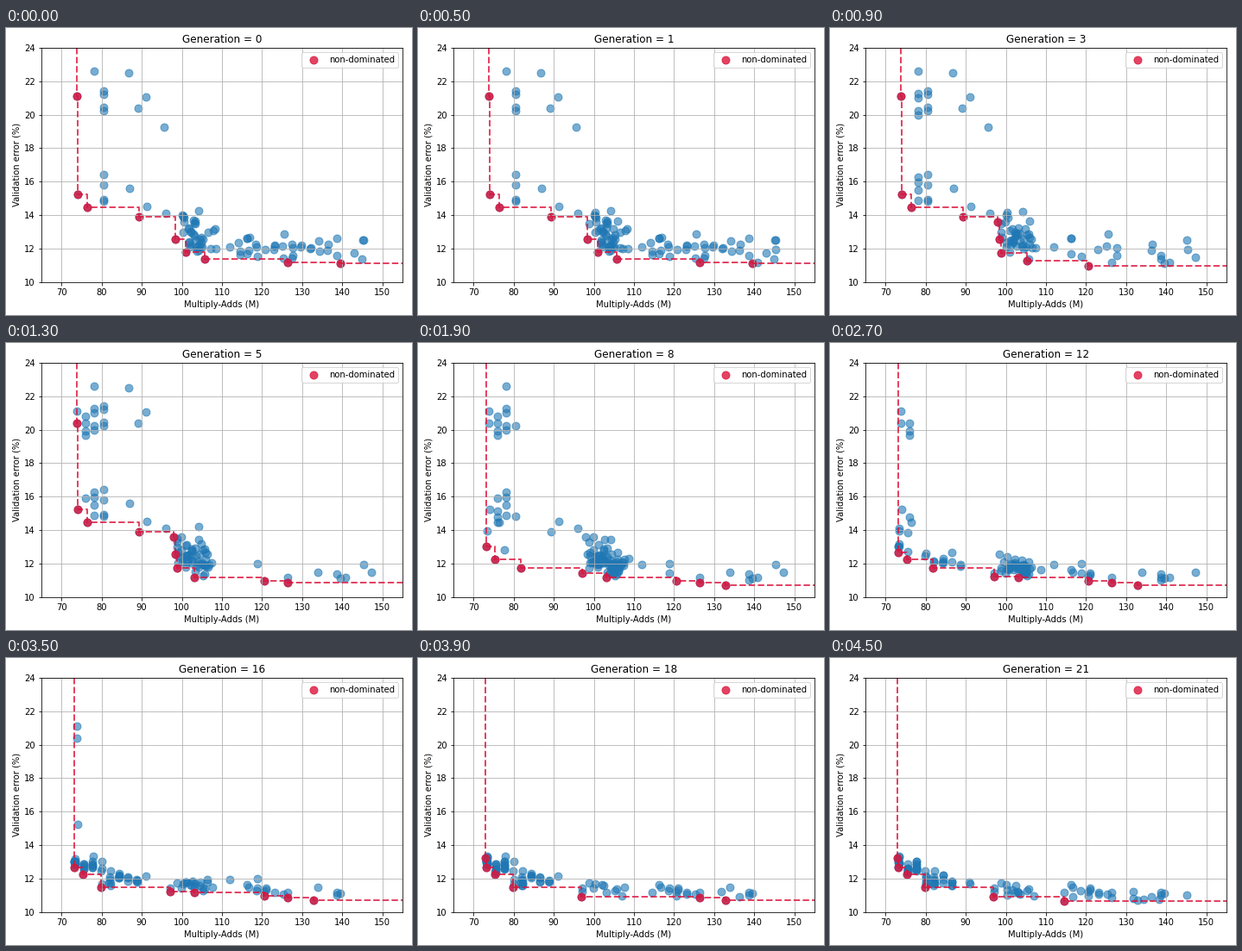
These frames come from a looping animation (470x333 px, 5 s). A matplotlib script:

```python
import matplotlib.pyplot as plt
import numpy as np
from matplotlib.animation import FuncAnimation

WIDTH, HEIGHT, DPI = 470, 333, 72
TICK_MS, LOOP_MS = 100, 5000
GENERATIONS = 22
COLUMN_STEP = 2.2  # designs cluster at regular multiply-add counts

# Designs that shape the front, by the generation that finds them.
LEADERS = {
    0: [(73.9, 21.1), (74.1, 15.25), (76.5, 14.45), (89.3, 13.9),
        (98.4, 12.55), (101, 11.77), (105.7, 11.37), (126.4, 11.2),
        (139.4, 11.12)],
    2: [(98, 13.6), (98.8, 11.75), (105.3, 11.3), (120.5, 10.97)],
    4: [(103.2, 11.2)],
    5: [(73.85, 20.4), (126.3, 10.87)],
    6: [(132.8, 10.7)],
    7: [(81.9, 11.75)],
    8: [(73.2, 13.05), (75.3, 12.25), (97.1, 11.45)],
    10: [(73.2, 12.65), (97.1, 11.25)],
    14: [(79.9, 11.5)],
    18: [(73, 13.25), (96.9, 10.9)],
    19: [(114.5, 10.65)],
}
OUTLIERS = [(78.1, 22.6), (86.8, 22.5), (91, 21.05), (89.1, 20.4),
            (95.6, 19.25), (87, 15.6), (91.3, 14.5), (95.9, 14.1)]

rng = np.random.default_rng(11)


def smoothstep(t):
    t = np.clip(t, 0, 1)
    return t * t * (3 - 2 * t)


def leaders_at(generation):
    return np.array([point for born, points in LEADERS.items()
                     if born <= generation for point in points])


def pareto_front(points):
    front, best = [], np.inf
    for x, y in sorted(map(tuple, points)):
        if y < best:
            front.append((x, y))
            best = y
    return np.array(front)


def depth(points, front):
    """How far each point lies behind the front; 4 M count as 1 %."""
    gaps = (points[:, None] - front[None]) / (4, 1)
    return gaps.min(axis=2).max(axis=1)


def tolerance(generation):
    return 0.8 + 4.8 / (1 + np.exp((generation - 7.3) / 1.5))


def offspring(generation):
    """Designs scattered above the front: cheap columns, knee and tail."""
    front = pareto_front(leaders_at(generation))
    cheap = 0.62 * smoothstep((generation - 6) / 7)
    tail = 0.15 + 0.3 * np.exp(-generation)
    spread = 0.35 + 0.8 * np.exp(-generation / 7)
    for _ in range(12 if generation else 75):
        pick, place = rng.random(2)
        life = rng.integers(4, 9) if generation else rng.integers(2, 5)
        scale = spread
        if pick < cheap:
            x = 73.2 + COLUMN_STEP * int(9 * place ** 1.6)
            x += rng.uniform(0, 0.25)
        elif pick > 1 - tail:
            x = 112.1 + COLUMN_STEP * int(17 * place)
            x += rng.uniform(-0.3, 0.3)
            scale = 0.6 * spread
            life = 2.5 * life if generation else life
        else:
            x = max(98.8, rng.normal(103.3, 2.4))
        height = front[front[:, 0] <= x, 1].min()
        yield x, height + rng.gamma(3, scale / 3), generation, generation + life


def bands():
    """Two bands of weak designs, each new column cheaper than the last."""
    for step, born in enumerate((0, 3, 5)):
        x = 80.4 - COLUMN_STEP * step
        for low, high, drop in ((20.2, 22.2, 0.5), (14.7, 16.5, 0.2)):
            for y in rng.uniform(low, high, 4) - drop * step:
                yield x, y, born, born + rng.integers(7, 10)


followers = np.array([(x, y, 0, GENERATIONS) for x, y in OUTLIERS]
                     + list(bands())
                     + [child for g in range(GENERATIONS)
                        for child in offspring(g)])


def population_at(generation):
    leaders = leaders_at(generation)
    front = pareto_front(leaders)
    born, dies = followers[:, 2:].T
    others = followers[(born <= generation) & (generation < dies), :2]
    others = others[depth(others, front) > 0]
    points = np.vstack([leaders, others])
    ceiling = 24 if generation < 18 else 14
    keep = (depth(points, front) < tolerance(generation))
    return points[keep & (points[:, 1] < ceiling)], front


fig = plt.figure(figsize=(WIDTH / DPI, HEIGHT / DPI), dpi=DPI)
ax = fig.add_axes([41 / WIDTH, 38.2 / HEIGHT, 418 / WIDTH, 271.8 / HEIGHT])
ax.set(xlim=(65, 155), ylim=(10, 24),
       xlabel="Multiply-Adds (M)", ylabel="Validation error (%)")
ax.grid(True)
title = ax.set_title("Generation = 0")
population = ax.scatter([], [], s=80, color="tab:blue", alpha=0.6)
elite = ax.scatter([], [], s=80, color="crimson", alpha=0.8,
                   label="non-dominated")
boundary, = ax.plot([], [], "--", color="crimson", lw=2, alpha=0.8,
                    drawstyle="steps-post")
ax.legend(loc="upper right")


def generation_at(ms):
    return 0 if ms < 500 else min(GENERATIONS - 1, 1 + (ms - 500) // 200)


def update(frame):
    generation = generation_at(frame * TICK_MS)
    points, front = population_at(generation)
    population.set_offsets(points)
    elite.set_offsets(front)
    path = np.vstack([(front[0, 0], 24), front, (155, front[-1, 1])])
    boundary.set_data(path.T)
    title.set_text(f"Generation = {generation}")
    return population, elite, boundary, title


anim = FuncAnimation(fig, update, frames=LOOP_MS // TICK_MS,
                     interval=TICK_MS, repeat=True, repeat_delay=0)
plt.show()
```
